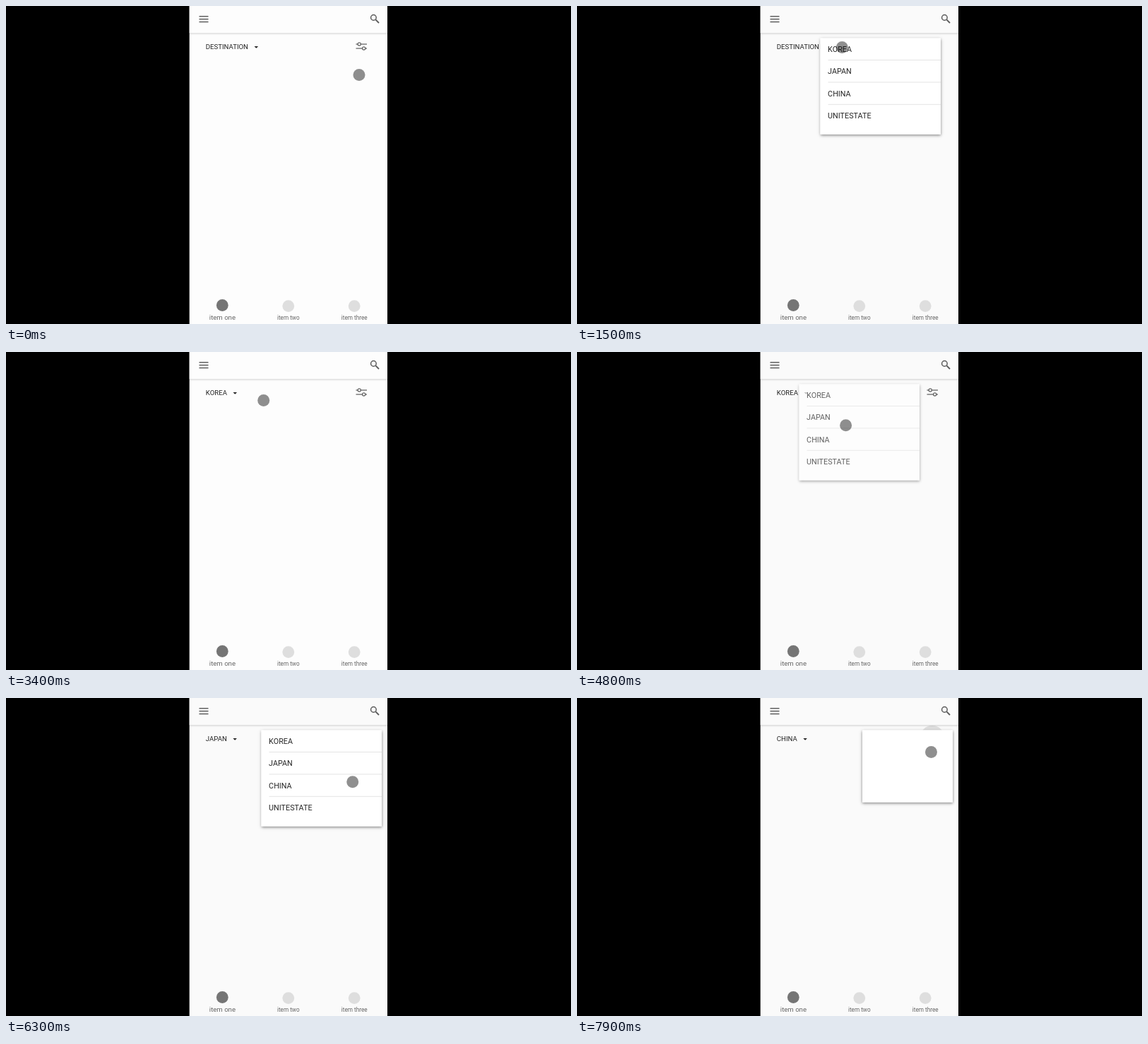
An HTML page with a canvas that plays this animation: 800 by 450 pixels, repeating every 8 s.

```html
<!DOCTYPE html>
<html>
<head>
<meta charset="utf-8">
<style>
  html, body { margin: 0; height: 100%; overflow: hidden; background: #000; }
  canvas { display: block; }
</style>
</head>
<body>
<canvas width="800" height="450"></canvas>
<script>
const ctx = document.querySelector('canvas').getContext('2d');
const LOOP = 8000, STEP = 100;
const COUNTRIES = ['KOREA', 'JAPAN', 'CHINA', 'UNITESTATE'];
const MENU = { y: 45.5, w: 170.5, h: 136 };

// Each menu grows from its left or right top corner
const menus = [
  { open: 900, close: 2205, x: 344.5, ripple: [353.5, 62] },
  { open: 3900, close: 4716, x: 314.5, ripple: [329, 62] },
  { open: 6000, close: 7000, x: 361.5, right: true, ripple: [503, 62] },
  { open: 7900, close: 9000, x: 361.5, right: true, ripple: [503, 56.5] },
];
const labels = [[0, 'DESTINATION'], [2700, 'KOREA'], [5200, 'JAPAN'], [7500, 'CHINA']];

// Pointer moves: start, end, target and an optional bend point
const start = [500, 97.5];
const moves = [
  { from: 0, to: 500, at: [353, 65.5] },
  { from: 1200, to: 1700, at: [383, 56] },
  { from: 2450, to: 2900, at: [416, 173] },
  { from: 3150, to: 3600, at: [331, 61], bend: [382, 47] },
  { from: 3950, to: 4300, at: [381, 92] },
  { from: 4700, to: 5070, at: [376, 240] },
  { from: 5150, to: 5700, at: [506, 61] },
  { from: 5950, to: 6450, at: [490, 124], bend: [493, 101] },
  { from: 7050, to: 7600, at: [501.5, 76.5] },
];

const clamp = v => Math.min(1, Math.max(0, v));
const ease = u => u < .5 ? 4 * u ** 3 : 1 - 4 * (1 - u) ** 3;

function disc(x, y, r, color) {
  ctx.fillStyle = color;
  ctx.beginPath();
  ctx.arc(x, y, r, 0, 7);
  ctx.fill();
}

function ring(x, y, r) {
  ctx.beginPath();
  ctx.arc(x, y, r, 0, 7);
  ctx.stroke();
}

function line(x1, y1, x2, y2) {
  ctx.beginPath();
  ctx.moveTo(x1, y1);
  ctx.lineTo(x2, y2);
  ctx.stroke();
}

function text(str, x, y, size, color, align = 'left') {
  ctx.font = `${size}px Roboto, sans-serif`;
  ctx.textAlign = align;
  ctx.fillStyle = color;
  ctx.fillText(str, x, y);
  return ctx.measureText(str).width;
}

function shadow(color, blur, y) {
  ctx.shadowColor = color;
  ctx.shadowBlur = blur;
  ctx.shadowOffsetY = y;
}

// A shadowed card whose shadow does not show through when translucent
function card(x, y, w, h) {
  ctx.save();
  ctx.beginPath();
  ctx.rect(0, 0, 800, 450);
  ctx.rect(x, y, w, h);
  ctx.clip('evenodd');
  shadow('rgba(0,0,0,.5)', 4, 1);
  ctx.fillStyle = '#fff';
  ctx.fillRect(x, y, w, h);
  ctx.restore();
  ctx.fillStyle = '#fff';
  ctx.fillRect(x, y, w, h);
}

function drawPage(t, dimmed) {
  const paper = dimmed ? '#fafafa' : '#fdfdfd';
  ctx.fillStyle = '#000';
  ctx.fillRect(0, 0, 800, 450);
  ctx.save();
  ctx.beginPath();
  ctx.rect(259.7, 0, 280.3, 450);
  ctx.clip();
  ctx.fillStyle = paper;
  ctx.fillRect(259, 0, 282, 450);
  shadow('rgba(0,0,0,.3)', 3, 1);
  ctx.fillRect(255, -5, 290, 43.3);
  ctx.restore();

  ctx.strokeStyle = '#5c5c5c';
  ctx.lineWidth = 1.5;
  for (const y of [14.7, 18.6, 22.5]) line(273.5, y, 286.5, y);
  ring(520.4, 16.4, 3.8);
  ctx.lineWidth = 1.9;
  line(523.4, 19.4, 528, 24);

  ctx.strokeStyle = '#666';
  ctx.lineWidth = 1.3;
  line(495.5, 54, 498, 54);
  line(502.4, 54, 511, 54);
  ring(500.2, 54, 2.1);
  line(495.5, 60, 504.5, 60);
  line(508.9, 60, 511, 60);
  ring(506.7, 60, 2.1);

  const label = labels.findLast(l => t >= l[0])[1];
  const arrow = 282.8 + text(label, 282.8, 61, 9.6, '#222') + 11.4;
  ctx.beginPath();
  ctx.moveTo(arrow - 2.8, 57);
  ctx.lineTo(arrow + 2.8, 57);
  ctx.lineTo(arrow, 59.8);
  ctx.fill();

  disc(306.3, 423.5, 8.4, '#757575');
  disc(399.8, 424.6, 8.4, '#dedede');
  disc(493.2, 424.6, 8.4, '#dedede');
  text('item one', 306.4, 444, 9.6, '#666', 'center');
  text('item two', 399.8, 443.5, 8.2, '#666', 'center');
  text('item three', 493.2, 443.5, 8.2, '#666', 'center');
}

function drawMenu(m, t) {
  const age = t - m.open;
  const opacity = 1 - clamp((t - m.close) / 300);
  const scale = 1 - .25 * (1 - clamp(age / 250)) ** 2;
  const w = MENU.w * scale, h = MENU.h * scale;
  const x = m.right ? m.x + MENU.w - w : m.x;

  disc(...m.ripple, 17.5, `rgba(0,0,0,${.11 * (1 - clamp(age / 300))})`);
  ctx.save();
  ctx.globalAlpha = opacity;
  card(x, MENU.y, w, h);

  ctx.globalAlpha = opacity * clamp((age - 50) / 200);
  ctx.strokeStyle = '#e4e4e4';
  ctx.lineWidth = 1;
  ctx.translate(x, MENU.y);
  ctx.scale(scale, scale);
  COUNTRIES.forEach((name, i) => {
    text(name, 10.6, 19.4 + i * 31.4, 10.8, '#262626');
    if (i) line(11, i * 31.4 - .4, MENU.w, i * 31.4 - .4);
  });
  ctx.restore();
}

function pointerAt(t) {
  let p = start;
  for (const { from, to, at, bend } of moves) {
    if (t <= from) break;
    const e = ease(clamp((t - from) / (to - from)));
    p = p.map((v, i) => {
      const c = bend ? bend[i] : (v + at[i]) / 2;
      return (1 - e) ** 2 * v + 2 * e * (1 - e) * c + e * e * at[i];
    });
  }
  return p;
}

function draw(now) {
  const t = Math.floor(now % LOOP / STEP) * STEP;
  const menu = menus.find(m => t >= m.open && t < m.close + 300);
  drawPage(t, menu);
  if (menu) drawMenu(menu, t);
  disc(...pointerAt(t), 8.5, 'rgba(0,0,0,.44)');
  requestAnimationFrame(draw);
}
requestAnimationFrame(draw);
</script>
</body>
</html>
```
